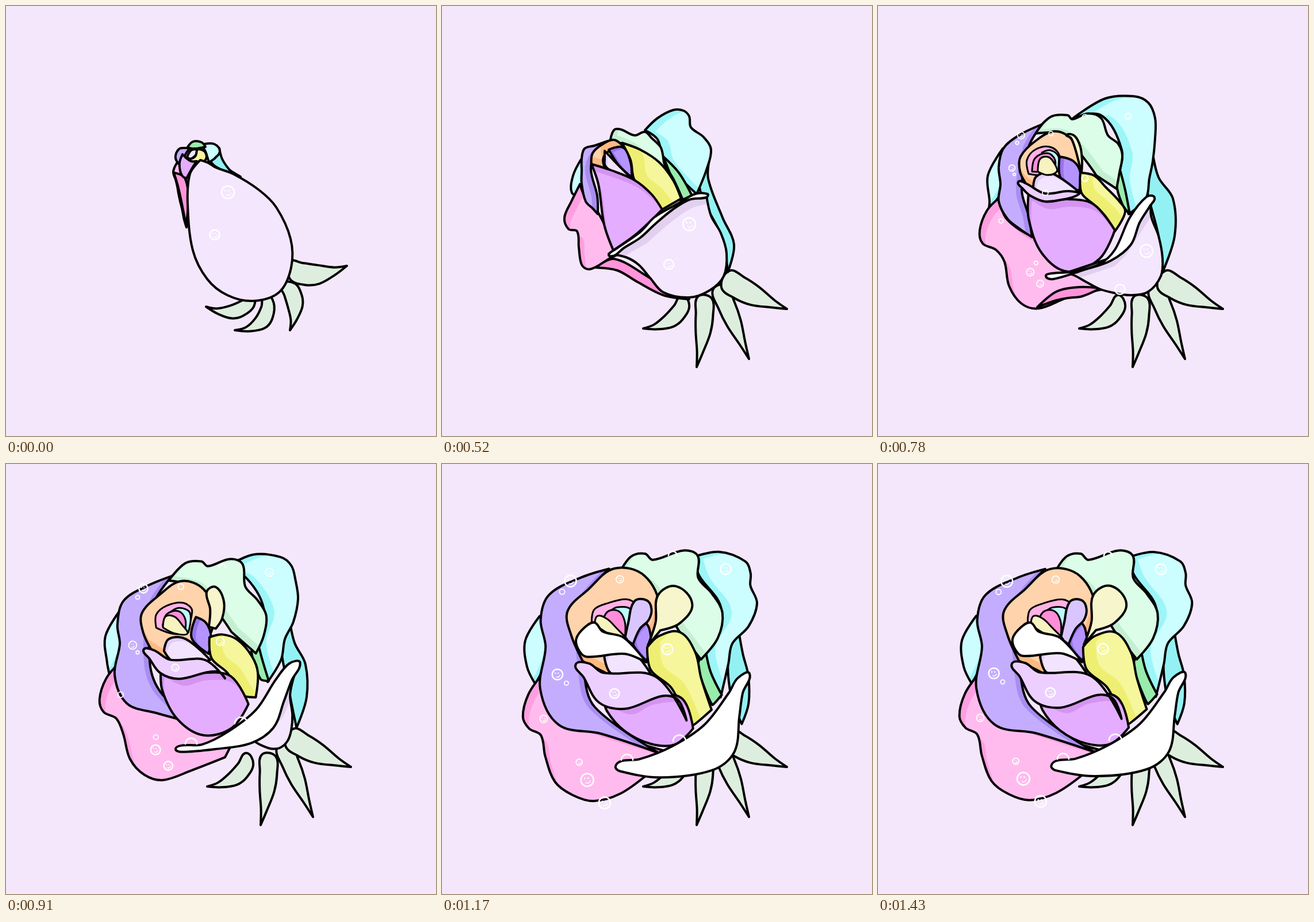
Animation, 748 px wide and 748 px high, one loop 1530 ms. Source, as an HTML page with a canvas:

```html
<!DOCTYPE html>
<html>
<head>
<meta charset="utf-8">
<title>Opening rose</title>
<style>
html, body { margin: 0; width: 100%; height: 100%; overflow: hidden; background: #f5e7fb; }
canvas { display: block; width: 748px; height: 748px; }
</style>
</head>
<body>
<canvas id="stage" width="748" height="748"></canvas>
<script>
const ctx = document.getElementById('stage').getContext('2d');
const STEP = 130, LOOP = 1530;
const mix = (a, b, t) => a + (b - a) * t;
const ease = t => t * (1.4 - .4 * t);

// Key points "x,y", with ! for a sharp corner
const parse = text => text.split(' ').map(s => {
  const [x, y] = s.split(',');
  return { x: +x, y: parseFloat(y), sharp: +y.endsWith('!') };
});

// A petal is keyed by how far the rose is open, 0 to 5; gaps are eased
function petal(fill, keys, { shade, dx = 0, dy = 0, width = 4 } = {}) {
  const at = Object.keys(keys).map(Number);
  return { fill, shade, dx, dy, width, at, shapes: at.map(k => parse(keys[k])) };
}

// Back to front
const petals = [
  petal('#ccfdff', { // far left
    2: '243,265! 228,295 226,325 242,330! 250,290',
    3: '217,248! 191,295 194,340 192,358! 225,300',
    5: '160,268! 135,310 138,355 156,388! 185,310'
  }, { shade: '#9cf5f7', dx: -9 }),
  petal('#94f1f3', { // right fold
    0: '371,247! 376,266 388,284 396,290 408,297! 375,285 356,268',
    1: '425,303! 462,336 490,368 503,420 495,463! 484,400 455,345',
    2: '466,262! 463,300 488,368 508,415 497,463! 488,405 448,315',
    3: '477,250! 488,298 513,335 516,400 495,463! 488,400 465,300',
    5: '525,303! 531,338 537,375 537,420 527,450! 505,400 506,330'
  }),
  petal('#ccfdff', { // right
    0: '338,243! 346,240 355,239 362,240 369,245 372,252 370,258 366,262 362,266 353,272! 350,262 347,253 343,247',
    1: '330,236! 350,226 368,213 380,209 389,213 392,234 412,248 412,275 425,303 452,330! 410,296 380,270 350,238',
    2: '353,216! 375,195 402,181 420,182 430,192 433,211 455,228 468,250 460,285 443,327! 415,300 385,265 375,232',
    3: '338,196! 395,161 445,157 470,168 482,195 482,230 478,270 472,300 466,335 436,362! 420,300 424,250 388,190',
    5: '457,155! 500,151 545,172 551,195 548,215 562,245 545,285 512,315 505,350 495,415! 465,325 499,255 460,195'
  }, { shade: '#9cf5f7', dx: 18, dy: 3 }),
  petal('#98ecac', { // green
    0: '315,247! 325,236 340,237 347,245! 330,248',
    1: '307,240! 325,234 350,240 372,292! 325,265',
    2: '385,262! 412,290 435,330! 415,338! 400,300',
    3: '421,285! 430,320 438,362! 425,345 415,310',
    5: '466,330! 475,370 497,410! 480,435! 452,360'
  }),
  petal('#dcfde7', { // mint
    1: '338,236! 342,236 347,236 352,237 358,239 364,242 370,246 374,255 378,266 382,280 387,292! 368,290! 358,255',
    2: '293,232! 300,215 312,215 335,225 353,219 365,230 380,245 384,258 387,275 402,300 418,335! 370,300! 330,250',
    3: '272,222! 300,193 330,190 338,197 365,187 388,195 400,225 418,240 425,260 420,290 415,318! 380,295! 320,225',
    4: '290,190! 320,159 347,156 360,165 405,151 427,160 427,205 450,234 471,265 467,305 448,337! 400,290! 340,210',
    5: '325,182! 335,162 357,156 371,168 430,150 457,160 458,193 482,219 499,255 488,302 452,342! 420,290! 370,215'
  }, { shade: '#c5efd2', dx: 12, dy: -7 }),
  petal('#ffbbee', { // pink
    0: '298,272! 293,281 291,290 295,302 298,314 300,326 303,340 306,352 308,362 310,372 314,385! 318,340! 314,305 308,285',
    1: '264,288! 250,312 244,332 262,346 265,362 264,378 280,388 290,388 302,396 308,402 315,412! 314,370! 300,340 280,318',
    2: '240,310! 225,340 213,368 220,388 235,392 238,420 243,450 255,458 275,450 290,440 305,433! 300,420! 272,360 250,335',
    3: '212,333! 190,355 177,390 182,413 205,424 220,445 228,487 250,518 280,526 330,507 395,492! 400,460! 262,398 222,368',
    5: '167,372! 142,410 133,450 145,470 165,482 171,522 190,567 222,588 260,599 305,588 352,548! 395,510! 240,465 180,425'
  }, { shade: '#fc9fe0', dx: 10, dy: 12 }),
  petal('#ff94da', { // pink underside
    0: '292,290! 299,313 304,335 309,360 313,382! 317,340 311,299',
    1: '310,398! 335,440 360,475 395,502 445,510! 395,492 345,440',
    2: '268,455! 305,460 340,480 385,503 430,510! 365,475 300,440',
    3: '277,524! 310,512 330,508 355,505 387,491! 350,489 310,497'
  }),
  petal('#c4adff', { // indigo
    0: '320,247! 310,247 302,248 297,254 295,260 295,265 297,270 300,273 304,276! 307,270 310,263 314,255',
    1: '300,252! 280,260 270,272 265,285 263,297 268,310 280,324 297,343 312,362! 318,335 316,315 300,280',
    2: '288,235! 265,243 248,248 243,265 243,285 243,310 250,340 262,352 271,362! 270,330 259,285 266,258',
    3: '285,206! 245,225 218,248 210,280 213,310 210,340 225,370 247,388 268,402! 262,365 250,320 262,245',
    4: '292,187! 245,204 195,232 183,280 188,315 175,385 200,447 270,463 375,485! 275,420 250,360 255,240',
    5: '290,179! 240,193 180,225 164,265 175,320 168,395 205,458 280,473 380,515! 260,425 245,360 240,240'
  }, { shade: '#a98df0', dx: -10, dy: 2 }),
  petal('#ffd3ab', { // orange
    1: '303,270! 301,262 300,256 302,252 308,249 312,262 314,285 310,280 306,275!',
    2: '260,278! 262,256 280,240 300,233 318,247! 300,249 286,256 280,268 285,285!',
    3: '258,310! 247,288 248,262 275,234 308,218 338,233 354,275 330,320 280,328!',
    5: '242,350! 220,300 212,255 250,215 298,174 355,186 382,245 345,340 288,372!'
  }, { shade: '#ffb982', dx: -4, dy: -17 }),
  petal('#ffb2e6', { // heart, from the outside in
    3: '262,292! 259,268 275,249 302,246 316,264 300,292',
    5: '260,270! 266,250 290,241 325,233 340,242 315,300'
  }, { width: 3 }),
  petal('#bdf8fa', {
    3: '285,255! 300,251 314,262 314,288! 298,275',
    5: '285,265! 305,249 333,254 324,303! 305,285'
  }, { width: 3 }),
  petal('#ff8ed9', {
    3: '268,288! 273,265 295,256 308,268 306,290!',
    5: '282,268! 293,254 310,256 320,275 321,302!'
  }, { width: 3 }),
  petal('#b594ff', {
    2: '290,250! 315,246 328,272 330,298! 308,278',
    3: '316,262! 340,270 352,290 350,322! 318,300',
    5: '360,275! 365,290 366,320 357,347! 333,308'
  }, { shade: '#9873ea', dx: 8, dy: 4 }),
  petal('#dac6ff', {
    4: '314,302! 322,280 326,244 337,238 344,255 344,270 338,290 325,312!',
    5: '321,305! 325,275 340,236 368,236 378,250 370,272 348,285 337,315!'
  }),
  petal('#f2e3ff', {
    0: '315,263! 322,251 332,249! 331,258 325,264 320,266',
    1: '309,266! 316,267 324,290! 316,286 312,280 310,273',
    2: '283,252! 300,270 328,298! 300,290 284,278 283,265',
    3: '270,318! 275,297 300,290 348,322! 310,332 285,328',
    5: '285,340! 300,320 340,335 370,380! 325,380 294,370'
  }, { shade: '#e2cdf8', dx: 5, dy: 7 }),
  petal('#f6f3c0', {
    3: '278,288! 282,266 297,263 308,276 311,288 295,294',
    5: '263,277! 268,264 285,271 302,287 325,310! 290,296'
  }, { width: 3 }),
  petal('#ffffff', {
    4: '242,295 255,281 267,277 276,292 318,302 353,342! 315,320 258,319 245,308',
    5: '228,310 243,287 264,275 282,291 315,302 357,347! 320,337 246,346 232,332'
  }),
  petal('#f6f69c', { // yellow
    0: '317,266! 324,265 330,260 332,249! 340,250 347,255 348,266 340,272 326,272',
    1: '311,250! 322,248 332,258 340,272 345,290! 335,291 325,290 322,280 318,268',
    2: '313,238! 345,250 378,272 402,303 416,335! 383,354! 360,325 335,303 328,268',
    3: '352,290! 376,295 396,315 420,340 430,358 412,392! 395,365 375,345 354,325',
    5: '358,325! 378,300 418,288 445,325 455,375 481,435! 440,477! 405,400 365,365'
  }, { shade: '#eeee72', dx: 22, dy: -8 }),
  petal('#f6f5cb', { // cream
    3: '345,255! 336,230 328,224 342,226 352,245 355,270 354,290!',
    4: '358,302! 368,268 363,222 380,206 397,235 390,268 372,284!',
    5: '358,325! 374,280 384,233 425,217 461,250 428,284 385,293!'
  }),
  petal('#e5adff', { // violet
    0: '307,258! 314,265 322,270 332,270! 325,280 314,300! 307,296 303,287 302,272',
    1: '280,264! 290,254 302,252 308,272 320,290! 314,314! 300,306 288,298 278,280',
    2: '260,275! 295,286 335,303 365,328 383,354! 340,395 298,425! 282,380 272,310',
    3: '262,325! 290,340 330,336 375,345 412,390! 385,440 330,462 285,430 262,370',
    5: '285,420! 330,440 370,420 425,420 442,475! 410,498 370,492 325,472 292,442'
  }, { shade: '#d494f0', dx: 6, dy: 13 }),
  petal('#eccfff', { // lilac lip
    3: '244,306 258,309 290,326 330,322 352,325! 345,330 330,335 290,340 265,330 252,318',
    5: '230,358 255,355 278,371 380,380 441,472! 425,428 395,418 325,444 275,433 245,382'
  }),
  petal('#f4e6fd', { // front
    0: '338,268! 320,292 316,345 325,425 350,475 385,503 430,513 475,498 496,455 495,405 470,350 440,320 395,292 365,281 352,273',
    1: '330,288! 316,315 312,380 325,420 350,460 385,495 430,508 470,495 492,465 492,425 475,385 450,340 410,302 385,292 358,294',
    2: '345,400! 290,431! 320,437 342,450 362,473 385,498 430,507 465,495 490,470 495,430 485,395 468,365 460,330! 425,338 385,365',
    3: '400,440! 325,465! 340,468 362,480 385,492 410,499 440,503 470,497 492,470 495,440 488,400 475,365 476,335! 440,390 420,420',
    4: '500,440! 480,460! 470,470 470,475 470,480 472,485 475,490 480,492 488,490 497,478 505,460 507,425 520,385! 510,410 505,430'
  }, { shade: '#e2d0ee', dx: 11, dy: 13 }),
  petal('#ffffff', { // front lip
    2: '290,433 302,423 345,393 370,367 410,344 440,327 462,327 460,333 430,337 400,355 370,380 345,403 315,422 300,434',
    3: '292,470 303,465 340,462 385,449 412,424 438,368 467,332 481,333 473,348 455,377 440,415 405,443 355,460 305,475',
    4: '297,513 307,506 342,505 385,478 450,430 490,380 510,357 532,354 513,395 503,435 482,488 440,514 370,520 305,518',
    5: '305,535 315,524 345,519 410,500 460,470 505,410 517,383 537,372 530,400 527,440 526,510 490,545 385,562 312,545'
  })
];

// Curled and spread leaf: base x, y, tip x, y, bend, half width
const leaves = [
  [[430, 512, 348, 523, -15, 13], [424, 512, 350, 561, -14, 14]],
  [[458, 508, 398, 564, -21, 14], [457, 507, 443, 628, -4, 15]],
  [[490, 483, 494, 564, -11, 15], [482, 490, 534, 614, 0, 15]],
  [[493, 460, 593, 452, 11, 19], [493, 475, 600, 527, 4, 20]]
];

// First and last x, y, last radius; a negative radius shows the top half
const drops = [
  [249, 225, 218, 199, 11], [242, 238, 202, 219, 5], [233, 282, 194, 384, 10],
  [237, 293, 212, 400, 4], [214, 374, 169, 458, 7], [265, 463, 250, 568, 12],
  [275, 447, 231, 534, 6], [282, 483, 283, 612, 11], [360, 300, 399, 327, 10],
  [435, 192, 506, 181, 10], [291, 325, 302, 415, 9], [301, 222, 311, 196, 7],
  [360, 193, 410, 152, -8]
];

function shapeAt({ at, shapes }, u) {
  const last = at.length - 1;
  if (u < at[0] || u > at[last]) return null;
  const i = Math.max(0, at.findIndex(k => k >= u) - 1);
  const t = ease((u - at[i]) / (at[i + 1] - at[i]));
  return shapes[i].map((p, k) => {
    const q = shapes[i + 1][k];
    return { x: mix(p.x, q.x, t), y: mix(p.y, q.y, t), sharp: mix(p.sharp, q.sharp, t) };
  });
}

// Smooth closed curve through the points
function trace(pts) {
  const n = pts.length;
  const tangent = i => {
    const a = pts[(i + n - 1) % n], b = pts[(i + 1) % n];
    const k = (1 - pts[i].sharp) / 3 / (Math.hypot(b.x - a.x, b.y - a.y) || 1);
    return [(b.x - a.x) * k, (b.y - a.y) * k];
  };
  ctx.beginPath();
  ctx.moveTo(pts[0].x, pts[0].y);
  pts.forEach((p, i) => {
    const j = (i + 1) % n, q = pts[j], len = Math.hypot(q.x - p.x, q.y - p.y);
    const [ax, ay] = tangent(i), [bx, by] = tangent(j);
    ctx.bezierCurveTo(p.x + ax * len, p.y + ay * len, q.x - bx * len, q.y - by * len, q.x, q.y);
  });
  ctx.closePath();
}

function paint(pts, { fill, shade, dx, dy, width }, depth) {
  trace(pts);
  ctx.fillStyle = shade || fill;
  ctx.fill();
  if (shade) {
    ctx.save();
    ctx.clip();
    ctx.translate(dx * depth, dy * depth);
    trace(pts);
    ctx.fillStyle = fill;
    ctx.fill();
    ctx.restore();
    trace(pts);
  }
  ctx.strokeStyle = '#000';
  ctx.lineWidth = width;
  ctx.stroke();
}

function leaf([curled, spread], t) {
  const [bx, by, tx, ty, bend, w] = curled.map((v, i) => mix(v, spread[i], t));
  const len = Math.hypot(tx - bx, ty - by), ux = (tx - bx) / len, uy = (ty - by) / len;
  const point = (s, side) => {
    const off = 4 * bend * s * (1 - s) + side * w;
    return { x: mix(bx, tx, s) - uy * off, y: mix(by, ty, s) + ux * off, sharp: s === 1 ? 1 : 0 };
  };
  const pts = [point(0, .8), point(.25, 1), point(.5, .85), point(.78, .35), point(1, 0),
    point(.78, -.35), point(.5, -.85), point(.25, -1), point(0, -.8)];
  paint(pts, { fill: '#deeede', width: 4 }, 0);
}

function arc(x, y, r, from, to) {
  ctx.beginPath();
  ctx.arc(x, y, r, from, to);
  ctx.stroke();
}

function bubble(x, y, r, half) {
  ctx.strokeStyle = ctx.fillStyle = '#fff';
  ctx.lineWidth = r > 7 ? 2.5 : 1.8;
  if (half) return arc(x, y, r, Math.PI, Math.PI * 2);
  arc(x, y, r, 0, 7);
  if (r < 5) return;
  ctx.lineWidth = 1.5;
  arc(x, y, r * .5, .3, 2);
  for (const ex of [-.4, .15]) {
    ctx.beginPath();
    ctx.arc(x + ex * r, y - r * .25, r * .13, 0, 7);
    ctx.fill();
  }
}

function bubbles(u) {
  // Two slide down the front petal, then sit behind its lip
  const slide = Math.pow(Math.min(u, 3) / 3, 1.5), sink = Math.max(0, u - 3), half = u > 3.2;
  if (half) {
    bubble(mix(407, 415, sink / 2), 436 + 31 * sink, 11, true);
    bubble(322, 473 + 28 * sink, 10, true);
  } else {
    bubble(mix(386, 467, slide), mix(324, 426, slide), 11);
    bubble(mix(363, 421, slide), mix(398, 493, slide), 8.5);
  }
  if (u < 3) return;
  const t = ease(sink / 2);
  for (const [x0, y0, x1, y1, r] of drops)
    bubble(mix(x0, x1, t), mix(y0, y1, t), Math.abs(r) * mix(.55, 1, t), r < 0);
}

function draw(u) {
  ctx.fillStyle = '#f5e7fb';
  ctx.fillRect(0, 0, 748, 748);
  ctx.lineJoin = ctx.lineCap = 'round';
  leaves.forEach(l => leaf(l, Math.min(1, u)));
  for (const p of petals) {
    const pts = shapeAt(p, u);
    if (pts) paint(pts, p, Math.min(1, u / 2));
  }
  bubbles(u);
}

// Held drawings: the rose opens, then settles back a little
let shown = -1;
function frame() {
  const step = Math.floor(performance.now() % LOOP / STEP);
  if (step !== shown) {
    shown = step;
    draw(step < 11 ? step / 2 : 4.45);
  }
  requestAnimationFrame(frame);
}
frame();
</script>
</body>
</html>
```
